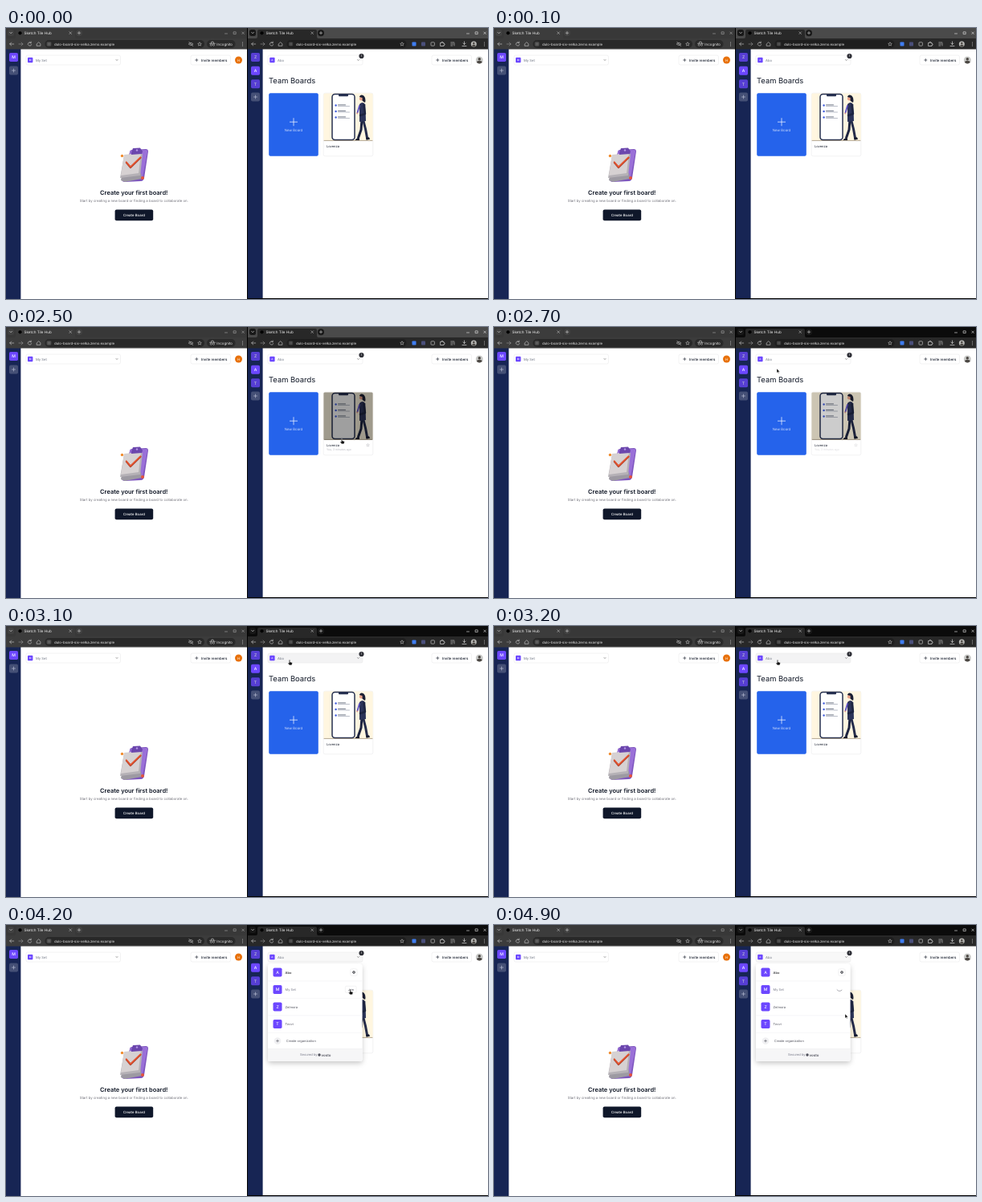
Write an HTML page that moves like this. It is 600 px wide and 338 px high and loops after 5 s.

```html
<!DOCTYPE html>
<html lang="en">
<head>
<meta charset="utf-8">
<title>Team boards</title>
<style>
html, body { margin: 0; width: 100%; height: 100%; overflow: hidden; background: #fff; }
svg { display: block; width: 100vw; height: 100vh; }
text { font-family: Inter, "Open Sans", sans-serif; text-rendering: geometricPrecision; white-space: pre; }
</style>
</head>
<body>
<svg id="stage" viewBox="0 0 600 338"></svg>
<script>
const PURPLE = '#6c47ff', NAVY = '#172554', INK = '#111827', GREY = '#6b7280', LINE = '#e4e4e7';

const rect = (x, y, w, h, fill, r = 0, more = '') =>
  `<rect x="${x}" y="${y}" width="${w}" height="${h}" rx="${r}" fill="${fill}" ${more}/>`;
const dot = (x, y, r, fill, more = '') => `<circle cx="${x}" cy="${y}" r="${r}" fill="${fill}" ${more}/>`;
const text = (x, y, size, str, fill = INK, more = '') =>
  `<text x="${x}" y="${y}" font-size="${size}" fill="${fill}" ${more}>${str}</text>`;
const shape = (d, fill, more = '') => `<path d="${d}" fill="${fill}" ${more}/>`;
const line = (d, color, w = .6) =>
  `<path d="${d}" fill="none" stroke="${color}" stroke-width="${w}" stroke-linecap="round" stroke-linejoin="round"/>`;
const group = (id, body, more = '') => `<g id="${id}" ${more}>${body}</g>`;
const box = (x, y, w, h, r = 2, fill = '#fff') => rect(x, y, w, h, fill, r, `stroke="${LINE}" stroke-width=".5"`);
const plus = (x, y, r, color, w) => line(`M${x - r} ${y}h${2 * r}M${x} ${y - r}v${2 * r}`, color, w);
const mid = 'text-anchor="middle"', medium = 'font-weight="500"', bold = 'font-weight="600"';

function tile(x, y, size, letter, more = '') {
  return `<g ${more}>` + rect(x, y, size, size, PURPLE, size * .16) +
    text(x + size / 2, y + size * .67, size * .46, letter, '#fff', `${mid} ${medium}`) + '</g>';
}

function chrome(id, x, strip, bar, pill, pillX, pillW, button, glyph) {
  const g = '#d0d0d0';
  return rect(x, 0, 300, 14, strip, 0, `id="${id}"`) + rect(x, 13, 300, 13.5, bar) +
    shape(`M${x + 10} 13q2 0 2-2V4q0-2 2-2h70q2 0 2 2v7q0 2 2 2z`, bar) +
    rect(x + 2, 2, 8, 8, button, 2.5) + line(`M${x + 4.7} 5.4l1.4 1.4 1.4-1.4`, g, .7) +
    dot(x + 17.5, 6.3, 2.1, '#000') +
    text(x + 22.5, 8, 4.6, 'Sketch Tile Hub', '#eee') +
    line(`M${x + 78.8} 4.8l2.8 2.8m0-2.8l-2.8 2.8`, g, .5) +
    dot(x + 91, 6.2, 4, button) + plus(x + 91, 6.2, 1.7, g, .6) +
    line(`M${x + 272.5} 7h3M${x + 283.5} 4.9h2.7v2.7h-2.7zM${x + 293.8} 5l2.6 2.6m0-2.6l-2.6 2.6`, glyph, .6) +
    line(`M${x + 9.7} 20h-5m2-2l-2 2 2 2`, g) + line(`M${x + 16} 20h5m-2-2l2 2-2 2`, '#999') +
    line(`M${x + 31.2} 18.5a2.2 2.2 0 1 0 .5 2.1m-.5-3.6v1.6h-1.6`, g) +
    line(`M${x + 38.5} 19.7l2.2-2 2.2 2v2.6h-4.4z`, g) +
    rect(pillX, 15, pillW, 10, pill, 5) + dot(pillX + 5, 20, 3.4, bar) +
    line(`M${pillX + 3.5} 19h1.3m1 0h.8M${pillX + 3.5} 21h.8m1 0h1.3`, g, .5) +
    text(pillX + 11.5, 21.5, 4.4, 'dulo-board-six-velka.zemo.example', '#e8e8e8') +
    [18, 20, 22].map(y => dot(x + 294.5, y, .5, g)).join('');
}

const star = (x, y, color, s = 1) => `<path transform="translate(${x} ${y}) scale(${s})" fill="none" stroke="${color}" stroke-width=".5"
  d="M0-2.3L.7-.8 2.3-.6 1.1.5 1.4 2.1 0 1.3-1.4 2.1-1.1.5-2.3-.6-.7-.8z"/>`;

const addTile = (x, y) => rect(x, y, 11, 11, '#fff', 2, 'opacity=".2"') + plus(x + 5.5, y + 5.5, 2, '#c5cade', .6);
const invite = x => box(x, 34, 49.5, 12) + plus(x + 7.3, 40, 1.6, INK, .6) +
  text(x + 13, 41.6, 4.4, 'Invite members', INK, medium);
const chevron = x => line(`M${x - 1} 39.5l1 1 1-1`, '#555', .6);

const clipboard =
  shape('M154 155Q154 152 157 152L174 151Q177 151 177 154L172 187Q171 191 168 191L148 192Q144 192 144 188z', '#7d55bd') +
  shape('M155 153L174 152Q177 152 176 155L170 187 147 189z', '#9a70d8') +
  shape('M144 184L168 181 169 188 148 192 143 190z', '#9d9aa2') +
  shape('M147 159L170 157 167 184 142 187z', '#b5b1b6') +
  shape('M147 158L168 156 165 181 143 184z', '#d6d1d2') +
  shape('M156 155L158 150 167 149.5 170 154 169 157 156 158z', '#6b46ad') + dot(163, 152.5, 1.2, '#b294e4') +
  line('M149.8 167.8L155 174 167.5 161.8', '#a83f2c', 2.2) + line('M149.8 167.2L155 173.2 167.5 161.2', '#e8552f', 1.6) +
  dot(144.5, 159.5, 1.7, '#f08a2c') + dot(170, 187, 2, '#e5533c');

const leftPage =
  rect(0, 26, 300, 312, '#fff') + rect(0, 26, 18.4, 312, NAVY) +
  tile(4, 31, 11, 'M') + addTile(4, 47.5) +
  box(25, 34, 117.5, 12) + tile(27, 36.8, 6.4, 'M') + text(37, 41.5, 4.2, 'My Set', GREY) + chevron(138) +
  invite(230) + dot(289.5, 40, 4.5, '#e8710a') + text(289.5, 41.6, 4.3, 'H', '#fff', mid) +
  clipboard +
  text(159.3, 207.7, 7.5, 'Create your first board!', INK, `${mid} ${bold}`) +
  text(159.3, 217.3, 4.35, 'Start by creating a new board or finding a board to collaborate on.', '#71717a', mid) +
  rect(135.6, 226.6, 47.6, 13.6, '#0f172a', 2) +
  text(159.3, 235, 4.35, 'Create Board', '#fff', `${mid} ${medium}`);

const phone = rect(406, 82.5, 28, 57, '#fff', 3.5, 'stroke="#263050" stroke-width="1.5"') +
  rect(414, 82.5, 12, 2.8, '#263050', 1) +
  [96.5, 104, 111.5].map(y => dot(410.6, y, 1.2, '#3f5bd9') +
    line(`M413.5 ${y - .6}h9`, '#4b5468', .8) + line(`M413.5 ${y + 1}h14`, '#9da2b0', .7)).join('');

const walker =
  line('M443 114L442 127 438.5 137', '#1d2440', 3) + line('M444.5 114L447.5 126 449.5 137', '#252c4a', 3) +
  shape('M436 138h4v2h-5.5z M448 137l4-.8 1 2.6-4.5 1z', '#11172c') +
  shape('M440 95Q444 91 447.3 95.5L448 116 440 117z', '#2b3358') +
  line('M445.5 96L447 107 441 109', '#1d2440', 2.4) +
  line('M440 97l-2.6 9', '#5b4fc4', 1.8) + dot(437.2, 106.5, .9, '#e9a28a') +
  dot(442.3, 88.2, 2.4, '#e9a28a') + shape('M439.8 86Q441.5 82 445.3 84.5 448.5 88 447 93L443.6 91 443.6 87z', '#1b1f33');

const card = box(395.2, 81.2, 61.6, 78.6) + rect(395.4, 81.4, 61.2, 59.4, '#fff6e0', 1.5) + phone + walker +
  line('M396 140.4h60', '#806f5b', .6) +
  rect(395.4, 81.4, 61.2, 59.4, '#000', 1.5, 'id="shade" opacity="0"') +
  text(399, 149, 4, 'Lovenza') +
  group('meta', text(399, 154.4, 3.4, 'You, 3 minutes ago', '#a1a1aa') + star(450.5, 147.3, '#8b8b94', .8), 'opacity="0"');

const rightPage =
  rect(300, 0, 300, 338, '#000') + rect(301, 26, 299, 311, '#fff') + rect(301, 26, 18.6, 311, NAVY) +
  tile(305, 31, 11, 'Z', 'opacity=".75"') + tile(305, 47.7, 11, 'A') + tile(305, 64.2, 11, 'T', 'opacity=".75"') +
  addTile(305, 80.5) +
  rect(326, 34, 118, 12, '#fff', 2, `id="trigger" stroke="${LINE}" stroke-width=".5"`) +
  tile(328.2, 36.8, 6.4, 'A') + text(338, 41.5, 4.2, 'Abo', GREY) + chevron(438.5) +
  dot(442.5, 35, 3.1, '#2f3037') + text(442.5, 36.3, 3.6, '1', '#fff', mid) +
  invite(530) +
  dot(589.3, 40, 4.5, '#c9cac8') + dot(589.3, 38.7, 1.7, '#4b4743') +
  shape('M585.8 42.8Q586.3 40.8 589.3 40.8T592.8 42.8Q589.3 46 585.8 42.8z', '#4b4743') +
  text(327, 69.3, 9.4, 'Team Boards') +
  rect(327.2, 81.2, 61.6, 78.6, '#2563eb', 2) + plus(358, 117.2, 4.6, '#fff', .7) +
  text(358, 129.4, 4.35, 'New Board', '#fff', `${mid} font-weight="300"`) +
  card;

const row = (y, name, letter, color, more = '') =>
  tile(332.5, y - 5.6, 11, letter) + text(347.6, y + 1.5, 4, name, color, more) +
  line(`M326.5 ${y + 10.8}h116.5`, '#efeff1', .5);

const menu =
  rect(326, 48.5, 117.5, 121.5, '#fff', 3.5, 'filter="url(#shadow)"') +
  row(59, 'Abo', 'A', '#212126', medium) + row(80.5, 'My Set', 'M', '#747686') +
  row(102, 'Zelmora', 'Z', '#50515c') + row(123.6, 'Tovvi', 'T', '#50515c') +
  rect(332.5, 74.9, 11, 11, '#929292', 1.7, 'id="blank"') +
  box(428.7, 54.8, 8.4, 8.4, 1.6) + dot(433, 59, 1.3, 'none', 'stroke="#33343c" stroke-width="1"') +
  group('join', box(422.3, 76.2, 13.8, 8.2, 1.6) + text(429.2, 81.6, 3.5, 'Join', '#50515c', `${mid} ${medium}`)) +
  group('spin', line('M427 80.8Q429.7 84 433 81.2', '#85868f', .7)) +
  dot(338, 144.6, 4.3, '#f0f0f2') + plus(338, 144.6, 1.4, '#55565f', .6) +
  text(348.8, 146.1, 4, 'Create organization', '#50515c') +
  shape('M326 154.5H443.5V166.5Q443.5 170 440 170H329.5Q326 170 326 166.5z', '#f6f6f7') +
  line('M326.3 154.5h117', '#e9e9ec', .5) +
  text(366, 163.4, 4, 'Secured by', '#747686') + dot(390, 162, 1.7, '#50515c') +
  text(392.6, 163.6, 4.4, 'vosto', '#50515c', bold);

const g = '#d6d6d6';
const leftTools = line('M227.5 20q2.7-3 5.4 0q-2.7 3-5.4 0M228 17.5l4.6 5', g, .6) + star(241, 20, g) +
  rect(250, 15, 35.5, 10, '#2a2a2a', 5) + dot(255.3, 21.2, 1.1, 'none', `stroke="${g}" stroke-width=".5"`) +
  dot(258.5, 21.2, 1.1, 'none', `stroke="${g}" stroke-width=".5"`) + line('M253.5 19.3h7M255.3 19l.5-1.8h2.3l.5 1.8', g, .6) +
  text(262.3, 21.6, 4.5, 'Incognito', '#eee');
const rightTools = star(493, 20, g) + rect(505.5, 17.5, 5, 5, '#3f7df0', .8) +
  rect(517, 17.5, 5, 5, '#4a4f7a', .8) + rect(529, 17.8, 4.4, 4.4, 'none', .8, `stroke="${g}" stroke-width=".6"`) +
  line('M541 18.5h1.3a.8.8 0 1 1 1.4 0h1.3v1.3a.8.8 0 1 1 0 1.4v1.3h-4z', g, .7) +
  line('M553.8 18h4M553.8 20h2.6M553.8 22h2M558 19v3', g, .6) +
  line('M570.5 17v3.6m-1.6-1.6l1.6 1.6 1.6-1.6M568 22.5h5', g, .7) +
  dot(582.3, 20, 3.5, '#b8b8b5') + dot(582.3, 19, 1.3, '#4b4743') + shape('M579.8 22q2.5-3 5 0-2.5 2.4-5 0', '#4b4743');

const arrow = shape('M0 0V5.2L1.3 4.1 2.1 5.8 2.9 5.4 2.1 3.8H3.8z', '#111', 'stroke="#fff" stroke-width=".35"');
const hand = shape('M-.6-.4Q0-1 .6-.4V2L3 2.6Q3.5 3 3.2 4L2.6 5.8H-.2L-2 3.4Q-1.8 2.6-.6 3.3z', '#111', 'stroke="#fff" stroke-width=".35"');

document.getElementById('stage').innerHTML =
  `<defs><filter id="shadow" x="-20%" y="-20%" width="140%" height="145%">
    <feDropShadow dx="0" dy="2.5" stdDeviation="3" flood-opacity=".22"/></filter></defs>` +
  leftPage + chrome('leftStrip', 0, '#383838', '#3c3c3c', '#282828', 48.5, 198.5, 'rgba(150,150,150,.1)', '#aaa') + leftTools +
  rightPage + chrome('rightStrip', 301, '#4a4a4a', '#282828', '#1e1e1e', 349.5, 149, '#181818', '#eee') + rightTools +
  group('menu', menu) +
  group('cursor', group('arrow', arrow) + group('hand', hand));

const $ = id => document.getElementById(id);
const show = (id, on) => $(id).setAttribute('opacity', Number(on));

// Each key is [time, ...values]; values run straight between keys.
function at(keys, t) {
  if (t <= keys[0][0]) return keys[0].slice(1);
  const i = keys.findIndex(k => k[0] > t);
  if (i < 0) return keys.at(-1).slice(1);
  const a = keys[i - 1], b = keys[i], p = (t - a[0]) / (b[0] - a[0]);
  return a.slice(1).map((v, n) => v + (b[n + 1] - v) * p);
}

const FOCUS = 2700, JOIN = 4400;
const path = [[2100, 430, 201], [2300, 428, 180], [2500, 418, 140], [2600, 402, 108], [2700, 352, 52],
  [3100, 353, 43], [3300, 353, 43], [3600, 357, 54], [3900, 368, 62], [4200, 428.5, 81],
  [4600, 428.5, 81], [4900, 437, 111]];
const shade = [[2350, 0], [2550, .5], [2600, .5], [2700, .2], [2800, 0]];
const opening = [[3250, 0], [3450, 1]];

function draw(t) {
  const [x, y] = at(path, t), [dark] = at(shade, t), [open] = at(opening, t);
  const onTrigger = t >= FOCUS && y > 34 && y < 46;
  const onCard = t < FOCUS && x > 395 && y > 81 && y < 160;
  const onJoin = t >= 4200 && t <= JOIN;
  const pointing = onTrigger || onCard || onJoin;
  show('cursor', t >= 2100);
  $('cursor').setAttribute('transform', `translate(${x} ${y})`);
  show('hand', pointing);
  show('arrow', !pointing);
  show('shade', dark);
  show('meta', dark * 2);
  $('rightStrip').setAttribute('fill', t < FOCUS ? '#4a4a4a' : '#0b0b0b');
  $('trigger').setAttribute('fill', onTrigger ? '#f3f3f4' : open ? '#f8f8f8' : '#fff');
  show('menu', open);
  $('menu').setAttribute('transform', `translate(0 ${(open - 1) * 3})`);
  show('blank', t < 3700);
  show('join', t < JOIN);
  show('spin', t >= JOIN);
}

const start = performance.now();
function tick() {
  const t = (performance.now() - start) % 5000;
  draw(Math.floor(t / 100) * 100);
  requestAnimationFrame(tick);
}
tick();
</script>
</body>
</html>
```
